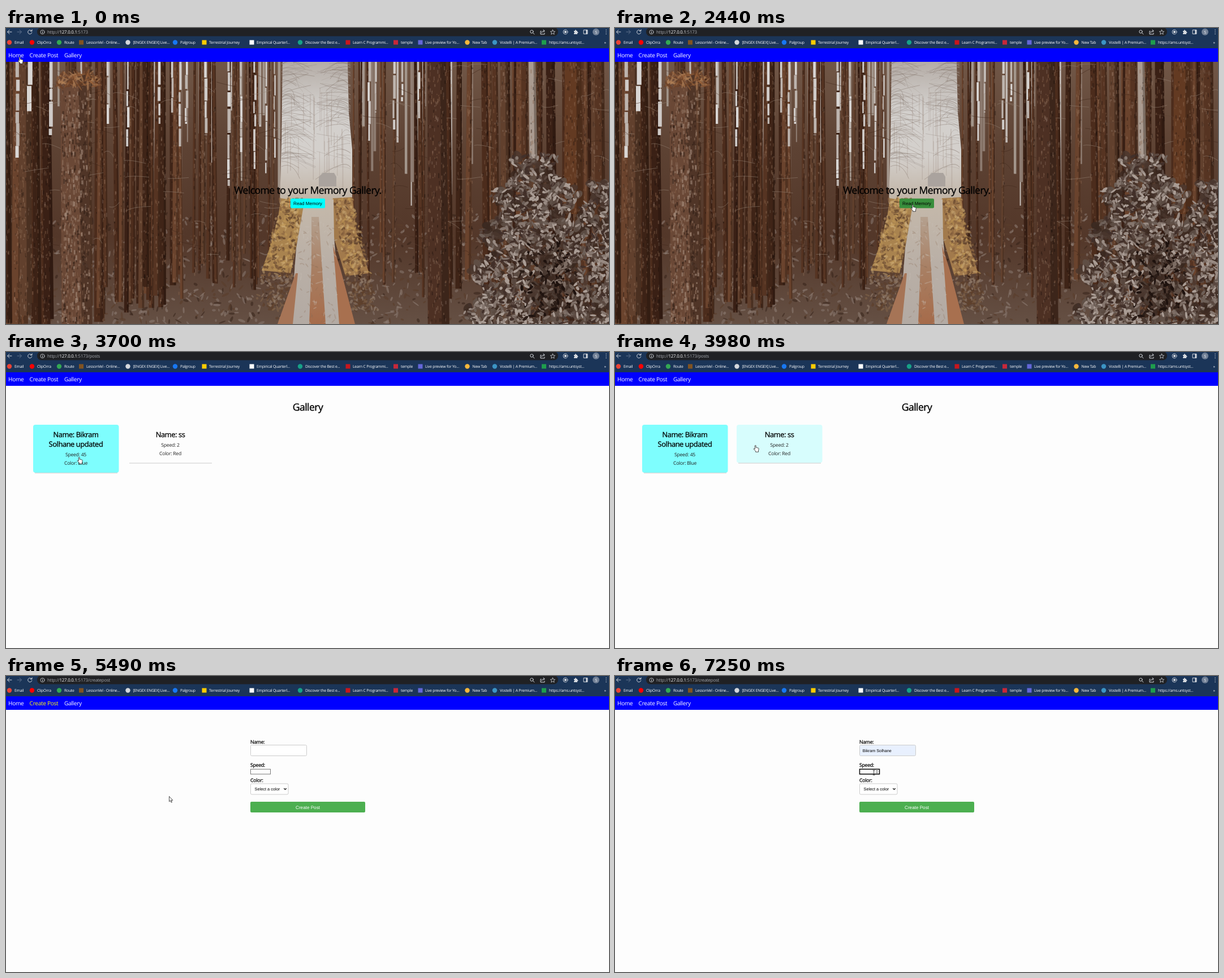
An HTML page with a canvas for the animation above (8 s loop, 1066x525 px).

```html
<!DOCTYPE html>
<html lang="en">
<head>
<meta charset="utf-8">
<title>Memory Gallery</title>
<style>
  html, body { margin: 0; width: 100%; height: 100%; overflow: hidden; background: #fdfdfd; }
  canvas, svg { position: absolute; left: 0; top: 0; display: block; }
  canvas { filter: blur(.6px); }
  svg text { font-family: "Open Sans", "Noto Sans", sans-serif; letter-spacing: -.03em; text-rendering: geometricPrecision; }
  .mid { text-anchor: middle; }
  svg .ui { font-family: "Liberation Sans", Arial, sans-serif; letter-spacing: 0; }
  .nav { font-size: 10.1px; fill: #fff; }
  .title { font-size: 17.5px; stroke: #000; stroke-width: .35px; }
  .name { font-size: 12.8px; stroke: #000; stroke-width: .3px; }
  .info { font-size: 8.6px; fill: #222; }
  .label { font-size: 8.7px; stroke: #000; stroke-width: .25px; }
  .marks text { font-size: 6.8px; fill: #fff; }
  .url { font-size: 7.9px; fill: #a5a8ad; }
  .icons { fill: none; stroke: #d5d9df; stroke-width: 1; stroke-linecap: round; stroke-linejoin: round; }
</style>
</head>
<body>
<canvas id="forest" width="1066" height="525"></canvas>
<svg width="1066" height="525" viewBox="0 0 1066 525">
  <g id="home">
    <text class="title mid" x="533.5" y="293.5">Welcome to your Memory Gallery.</text>
    <rect id="read" x="503" y="302.5" width="61" height="17" rx="2"/>
    <text class="ui mid" x="533.5" y="313.8" font-size="8.1">Read Memory</text>
  </g>

  <g id="gallery">
    <rect y="60" width="1066" height="465" fill="#fdfdfd"/>
    <text class="title mid" x="533.5" y="104">Gallery</text>
    <g id="cards">
      <path d="M51 214.6H197M218 197.2H364" stroke="#d6d6d6" stroke-width="1.2"/>
      <rect id="card1" x="48" y="129" width="151.5" height="85" rx="4" fill="#0ff"/>
      <rect id="card2" x="215" y="129" width="151.5" height="67.5" rx="4" fill="#0ff"/>
      <g class="mid">
        <text class="name" x="123.5" y="150.5">Name: Bikram</text>
        <text class="name" x="123.5" y="168">Solhane updated</text>
        <text class="info" x="123.5" y="185">Speed: 45</text>
        <text class="info" x="123.5" y="200.2">Color: Blue</text>
        <text class="name" x="290.5" y="150.5">Name: ss</text>
        <text class="info" x="290.5" y="167.5">Speed: 2</text>
        <text class="info" x="290.5" y="182.7">Color: Red</text>
      </g>
    </g>
  </g>

  <g id="form">
    <rect y="60" width="1066" height="465" fill="#fdfdfd"/>
    <text class="label" x="432" y="120">Name:</text>
    <rect id="nameBox" x="432.5" y="122.5" width="99" height="19" rx="2"/>
    <text id="nameText" class="ui" x="437.7" y="134.5" font-size="7.25">Bikram Solhane</text>
    <text class="label" x="432" y="160.8">Speed:</text>
    <rect id="speedBox" x="432.5" y="165.3" width="35" height="8.7" fill="#fff"/>
    <path id="spin" d="M461.3 169l1.8-2 1.8 2zM461.3 170.7l1.8 2 1.8-2z" fill="#444"/>
    <text class="label" x="432" y="188.4">Color:</text>
    <rect x="432.5" y="191" width="66.5" height="19" rx="2" fill="#fff" stroke="#ccc"/>
    <text class="ui" x="439.5" y="203" font-size="7.4">Select a color</text>
    <path d="M491.3 199.2l2.2 2.2 2.2-2.2" fill="none" stroke="#111" stroke-width="1.3"/>
    <rect x="432" y="223" width="203" height="19" rx="2" fill="#4caf50"/>
    <text class="ui mid" x="533.5" y="235.6" font-size="8.15" fill="#fff">Create Post</text>
    <g id="popup">
      <rect x="434" y="144" width="164" height="129" rx="3" fill="#fff" stroke="#d4d4d4"/>
      <rect id="row" x="434.5" y="147" width="163" height="19" fill="#e8e8e8"/>
      <g font-size="7.2" fill="#222">
        <text x="441" y="159">Bikram Solhane</text>
        <text x="441" y="178">Bikram Solhane updated</text>
        <text x="441" y="197">ss</text>
      </g>
    </g>
  </g>

  <rect width="1066" height="36" fill="#1b3558"/>
  <rect x="55" y="-1" width="921" height="15.5" rx="7.5" fill="#202124"/>
  <text class="url" x="73" y="10.2">http://<tspan fill="#fff">127.0.0.1</tspan>:5173<tspan id="path"></tspan></text>
  <g class="icons">
    <path d="M10 7H3M6 3.5L2.5 7 6 10.5"/>
    <path d="M20 7h7M24 3.5L27.5 7 24 10.5" stroke="#62758f"/>
    <path d="M45.2 5A3.6 3.6 0 1 0 45.8 8M46 2.8V5.5H43.3"/>
    <circle cx="64.5" cy="7.2" r="3.6" stroke-width=".8"/><path d="M64.5 7v2M64.5 5.2v.1"/>
    <circle cx="929.5" cy="6.5" r="2.7"/><path d="M931.6 8.6l2.4 2.4"/>
    <path d="M946 5.5h-1v5.5h7V9M947 8.5c.4-2.5 2-3.3 4.5-3.3M950 3l2.3 2.2L950 7.4"/>
    <path d="M966.5 3.2l1.2 2.8 3 .2-2.3 2 .8 3-2.7-1.6-2.7 1.6.8-3-2.3-2 3-.2z" stroke-width=".8"/>
    <circle cx="989" cy="7" r="4" stroke-width=".9"/><circle cx="989" cy="7" r="1.7" fill="#d5d9df"/>
    <path d="M1004 5h2c-.6-2.2 2.6-2.2 2 0h2v2c2-.5 2 2.5 0 2v2h-6V9c1.5 0 1.5-2 0-2z" fill="#d5d9df" stroke="none"/>
    <path d="M1021.5 3.5h6.5v7h-6.5z"/><path d="M1026.5 4v6" stroke-width="2.4"/>
    <path d="M1061 3.5v.1M1061 7v.1M1061 10.5v.1" stroke-width="1.5"/>
  </g>
  <circle cx="1043" cy="7" r="6" fill="#718096"/>
  <text class="mid" x="1043" y="9.5" font-size="7" fill="#fff">S</text>
  <rect id="markHover" x="39" y="18" width="45" height="15" rx="7" fill="#344a68"/>
  <g id="marks" class="marks"></g>

  <rect y="36" width="1066" height="24" fill="#00f"/>
  <text id="navHome" class="nav" x="4" y="52.2">Home</text>
  <text id="navCreate" class="nav" x="41.6" y="52.2">Create Post</text>
  <text class="nav" x="103" y="52.2">Gallery</text>

  <g id="cursor" stroke-linejoin="round">
    <path id="arrow" d="M0 0V9.3L2.1 7.4 3.6 10.8 5 10.2 3.5 6.9H6.3Z" fill="#fff" stroke="#222" stroke-width=".8"/>
    <path id="hand" d="M2.4 1Q3.3 0 4.2 1V4.4L8.5 5.3Q9.3 5.8 9.2 7L8.5 10V12.3H3.6V10.8L.2 7.3Q0 6.2 1.2 6.3L2.4 7.3Z" fill="#fff" stroke="#222" stroke-width=".8"/>
    <path id="beam" d="M-2-4.5Q0-4.5 0-3.5Q0-4.5 2-4.5M0-3.5V3.5M-2 4.5Q0 4.5 0 3.5Q0 4.5 2 4.5" fill="none" stroke="#222" stroke-width=".9"/>
  </g>
</svg>
<script>
const LOOP = 8000;
const el = id => document.getElementById(id);

// Forest picture
function paintForest() {
  const g = el('forest').getContext('2d');
  let seed = 41;
  const rnd = () => {
    seed = (seed + 0x6D2B79F5) | 0;
    let v = Math.imul(seed ^ (seed >>> 15), 1 | seed);
    v ^= v + Math.imul(v ^ (v >>> 7), 61 | v);
    return ((v ^ (v >>> 14)) >>> 0) / 4294967296;
  };
  const span = (a, b) => a + rnd() * (b - a);
  const pick = list => list[Math.floor(rnd() * list.length)];
  const shape = (color, ...points) => {
    g.fillStyle = color;
    g.beginPath();
    points.forEach(([x, y]) => g.lineTo(x, y));
    g.fill();
  };
  const fade = (y0, y1, ...colors) => {
    const f = g.createLinearGradient(0, y0, 0, y1);
    colors.forEach((c, i) => f.addColorStop(i / (colors.length - 1), c));
    return f;
  };
  const leaf = (x, y, w, h, color) => {
    g.fillStyle = color;
    g.beginPath();
    g.ellipse(x, y, w, h, span(0, 3.14), 0, 6.3);
    g.fill();
  };
  const bark = ['#3f2417', '#4c2c1c', '#563422', '#61402d', '#3a2015', '#6a432d'];
  const trunk = (x, w, top, bottom, color) => {
    const lean = span(-4, 4);
    shape(color, [x, top], [x + w * .85, top], [x + lean + w, bottom], [x + lean, bottom]);
    shape('#1c0f0b55', [x + w * .6, top], [x + w * .85, top], [x + lean + w, bottom], [x + lean + w * .65, bottom]);
    for (let i = (bottom - top) * w / 60; i > 0; i--) {
      g.fillStyle = pick(['#a3816a55', '#8a654d66', '#170c0955', '#c0a99a33']);
      g.fillRect(x + rnd() * w * .85, span(top, bottom), span(1, 2.4), span(2, 8));
    }
  };
  const slit = (x, w, bottom) => {
    for (let y = 60; y < bottom;) {
      const h = span(15, 50);
      g.fillStyle = pick(['#cfcac7', '#bdb4ae', '#d9d6d4']);
      g.fillRect(x + span(-1, 1), y, w * span(.6, 1), Math.min(h, bottom - y));
      y += h + span(0, 5);
    }
  };

  g.fillStyle = fade(60, 525, '#715747', '#5d4233', '#533729', '#655044');
  g.fillRect(0, 60, 1066, 465);

  for (let i = 0; i < 70; i++) {
    g.fillStyle = pick(['#c0b8b3', '#a2958b', '#8d7b70']);
    g.fillRect(rnd() < .55 ? span(0, 485) : span(615, 930), 60, span(2, 5), span(60, 260));
  }
  for (let i = 0; i < 1500; i++) {
    leaf(span(0, 1066), span(330, 525), span(2, 7), span(1, 2.5), pick(['#83736a99', '#93827888', '#34211888', '#5a3d2b99']));
  }
  for (let i = 0; i < 118; i++) {
    const left = rnd() < .53;
    const d = Math.pow(rnd(), .85);
    const x = left ? 480 - d * 492 : 607 + d * 465;
    trunk(x, 3 + d * span(4, 21), 60, span(385, 455) + d * 110, pick(bark));
  }

  // Sky between the trunks
  const gaps = [
    [17, 8, 230], [38, 11, 150], [76, 7, 190], [178, 6, 170], [213, 5, 210], [269, 5, 170],
    [292, 4, 150], [306, 5, 210], [317, 5, 170], [351, 6, 190], [392, 6, 280], [414, 4, 220],
    [438, 4, 250], [458, 4, 260], [474, 3, 230], [640, 5, 200], [652, 3, 150], [684, 5, 180], [699, 5, 130], [728, 4, 160]
  ];
  gaps.forEach(([x, w, bottom]) => slit(x, w, bottom));
  for (let i = 0; i < 170; i++) {
    const x = rnd() < .55 ? span(0, 480) : span(615, 1060), y = span(65, 420);
    g.strokeStyle = pick(['#40281c88', '#95817388', '#5f453688']);
    g.beginPath();
    g.moveTo(x, y);
    g.quadraticCurveTo(x + 10, y + span(-8, 4), x + span(15, 45), y + span(-10, 14));
    g.stroke();
  }

  // Clearing
  shape(fade(60, 310, '#b5ada7', '#d3d0cd', '#d4d0cc', '#bfb2a3'),
    [489, 60], [604, 60], [606, 150], [612, 215], [612, 302], [575, 305], [530, 330], [484, 312], [487, 200]);
  g.lineWidth = .7;
  for (let i = 0; i < 190; i++) {
    const left = rnd() < .5, x = left ? 487 : 609, y = 60 + 190 * Math.pow(rnd(), 1.5), s = left ? 1 : -1;
    g.strokeStyle = pick(['#8b7f7877', '#69564b77', '#aaa29b99']);
    g.beginPath();
    g.moveTo(x, y);
    g.quadraticCurveTo(x + s * span(8, 25), y - span(0, 20), x + s * span(20, 65), y + span(-18, 22));
    g.stroke();
  }
  for (let i = 0; i < 26; i++) {
    g.fillStyle = '#96857844';
    g.fillRect(span(490, 610), span(100, 220), span(1, 2), span(50, 90));
  }
  shape('#aaa39e', [553, 264], [560, 257], [580, 257], [584, 264], [584, 281], [553, 281]);

  // Verges and track
  shape('#a9834f', [486, 302], [528, 308], [513, 390], [503, 435], [452, 430], [468, 385], [481, 335]);
  shape('#a27a4c', [578, 302], [612, 300], [621, 370], [642, 435], [600, 440], [579, 370]);
  for (let i = 0; i < 800; i++) {
    const y = span(303, 500), k = (y - 303) / 197;
    const x = rnd() < .5 ? span(484 - 45 * k, 525 - 28 * k) : span(577 + 35 * k, 613 + 45 * k);
    const tones = y < 440 ? ['#c0985699', '#8a6540aa', '#5e402caa', '#cfb07b77'] : ['#7d6048aa', '#5e402caa', '#8f7a69aa'];
    leaf(x, y, span(2, 5), span(1, 2.4), pick(tones));
  }
  shape(fade(315, 525, '#c4b8aa', '#b9afa6', '#b3aaa3'), [527, 310], [579, 304], [580, 370], [592, 525], [503, 525], [513, 390]);
  shape('#a8704f', [578, 385], [592, 430], [617, 525], [589, 525], [582, 430]);
  shape('#a67456', [512, 435], [516, 435], [507, 525], [480, 525]);
  shape(fade(330, 525, '#b5a291', '#a87f63', '#a66b4a'), [540, 335], [553, 335], [559, 430], [565, 525], [536, 525], [540, 420]);
  for (let i = 0; i < 110; i++) {
    leaf(span(515, 585), span(340, 525), span(2, 5), 1, pick(['#c9c0b855', '#896b5844']));
  }

  // Foreground trees
  trunk(96, 54, 82, 525, '#6a4836');
  for (let i = 0; i < 420; i++) {
    g.fillStyle = pick(['#a58c7c99', '#8c6e5c99', '#2e1c1477']);
    g.fillRect(span(98, 147), span(112, 525), span(1, 4), span(3, 9));
  }
  for (let i = 0; i < 90; i++) {
    leaf(span(90, 165), span(79, 104), span(4, 10), span(1, 2), pick(['#96603a99', '#6c412699', '#b0805699']));
  }
  trunk(745, 38, 60, 525, '#4d3023');
  trunk(988, 34, 60, 330, '#633a22');
  trunk(924, 14, 60, 240, '#aa9b90');

  // Shrub, in ragged tiers
  const inShrub = (x, y) => {
    const k = (y - 222) / 300, ragged = 14 * Math.sin(y / 11);
    const cone = k > 0 && Math.abs(x - 935) < 12 + 105 * Math.sqrt(k) + ragged;
    return cone || (x > 1025 + ragged && y > 275) || (x > 985 && y > 390);
  };
  for (let i = 0; i < 2900; i++) {
    const x = span(810, 1070), y = span(224, 530);
    if (!inShrub(x, y)) continue;
    if (i < 800) { leaf(x, y, 9, 6, pick(['#4a372ecc', '#3b2920cc', '#62524acc'])); continue; }
    const core = Math.hypot((x - 960) / 60, (y - 450) / 85) < span(.4, 1.1);
    leaf(x, y, span(3, 7), span(1.3, 2.8), pick(core
      ? ['#1e120e', '#2c1e18', '#4a3a32', '#7d6d64']
      : ['#85766e', '#988a82', '#6e6058', '#5a4840', '#aa9d95', '#42302a']));
  }
}

// Bookmark: icon centre, icon colour, square or round, label offset, label
[
  [6, '#ea4335', 0, 9, 'Email'],
  [46, '#f00', 0, 9, 'ClipOrra'],
  [94, '#34a853', 0, 9, 'Route'],
  [133, '#805322', 1, 9, 'LessonVel - Online...'],
  [215.5, '#d4d7dc', 0, 9, '[ENGEX ENGEX] Live...'],
  [299, '#1877f2', 0, 9, 'Palgroup'],
  [350.5, '#fc0', 1, 8.5, 'Terrestrial Journey'],
  [434.5, '#fff', 1, 8.5, 'Empirical Quarterl...'],
  [520, '#17a087', 0, 9, 'Discover the Best e...'],
  [604.5, '#c8161d', 1, 8.5, 'Learn C Programmi...'],
  [689, '#c6283a', 1, 9, 'temple'],
  [732.5, '#6366d8', 1, 8.5, 'Live preview for Yo...'],
  [815.5, '#f6b73c', 0, 9, 'New Tab'],
  [864, '#3c94c4', 0, 9, 'Vostelli | A Premium...'],
  [951, '#1f9d4d', 1, 9, 'https://ams.untsyst...'],
  [1050, 'none', 0, 7.5, '»']
].forEach(([x, color, square, gap, label]) => {
  const icon = square
    ? `<rect x="${x - 4}" y="21.5" width="8" height="8" fill="${color}"/>`
    : `<circle cx="${x}" cy="25.5" r="4.2" fill="${color}"/>`;
  el('marks').innerHTML += `${icon}<text x="${x + gap}" y="27.8">${label}</text>`;
});

// Held states: [start, value...]
const tracks = {
  cursor: [
    [0, 'hand', 21, 51], [740, 'hand', 21, 54], [890, 'arrow', 581, 257], [1030, 'hand', 21, 54],
    [1170, 'arrow', 180, 130], [1290, 'arrow', 468, 227], [1410, 'arrow', 330, 110], [1540, 'arrow', 215, 62],
    [1660, 'arrow', 260, 159], [1800, 'arrow', 150, 100], [1920, 'hand', 70, 49],
    [2070, 'arrow', 210, 150], [2190, 'arrow', 410, 270], [2320, 'arrow', 540, 319], [2440, 'hand', 523, 313],
    [2840, 'arrow', 526, 313], [2990, 'arrow', 598, 312], [3130, 'arrow', 493, 105], [3270, 'arrow', 277, 251],
    [3420, 'arrow', 374, 112], [3550, 'hand', 150, 170], [3700, 'hand', 126, 186], [3850, 'hand', 150, 180],
    [3980, 'hand', 245, 165], [4110, 'hand', 290, 150], [4230, 'arrow', 190, 110], [4360, 'arrow', 54, 32],
    [4510, 'arrow', 56, 34], [4640, 'hand', 66, 48], [4760, 'hand', 74, 53], [5230, 'hand', 75, 56],
    [5350, 'hand', 76, 59], [5490, 'arrow', 288.5, 213.5], [5650, 'arrow', 595, 170], [5800, 'arrow', 520, 150],
    [5930, 'beam', 470, 131], [6450, 'arrow', 478, 148], [6590, 'arrow', 474, 153], [6830, 'arrow', 466, 151],
    [6970, 'arrow', 464, 156], [7120, 'beam', 464, 169], [7250, 'beam', 457.7, 171.5]
  ],
  page: [[0, 'home'], [2840, 'gallery'], [5490, 'form']],
  path: [[0, ''], [2840, '/posts'], [5230, '/createpost']],
  homeLink: [[0, '#fff'], [150, '#ff0'], [890, '#ff9'], [1030, '#fff']],
  createLink: [[0, '#fff'], [1920, '#ff0'], [2070, '#fff'], [4640, '#ff0'], [5650, '#fff']],
  read: [[0, '#0ff'], [2440, '#388e3c']],
  card1: [[0, 0], [3550, .18], [3700, .5], [3850, .95], [3980, .5], [4110, .1], [4230, 0]],
  card2: [[0, 0], [3980, .15], [4110, .6], [4230, .5], [4360, .18], [4510, 0]]
};
const at = (name, t) => tracks[name].findLast(step => step[0] <= t).slice(1);
const show = (id, on) => { el(id).style.display = on ? '' : 'none'; };
const paint = (id, color) => { el(id).style.fill = color; };
const border = (id, focused, color) => {
  el(id).style.stroke = focused ? '#111' : color;
  el(id).style.strokeWidth = focused ? 1.6 : 1;
};

function render(t) {
  const [page] = at('page', t);
  ['home', 'gallery', 'form'].forEach(id => show(id, id === page));
  show('cards', t >= 2990);
  el('path').textContent = at('path', t)[0];

  paint('navHome', at('homeLink', t)[0]);
  paint('navCreate', at('createLink', t)[0]);
  paint('read', at('read', t)[0]);
  ['card1', 'card2'].forEach(id => { el(id).style.opacity = at(id, t)[0]; });
  show('markHover', t >= 4360 && t < 4640);

  const filled = t >= 6590;
  paint('nameBox', filled ? '#e8f0fe' : '#fff');
  border('nameBox', t >= 6190 && t < 7120, '#ccc');
  border('speedBox', t >= 7250, '#777');
  show('nameText', filled);
  show('popup', t >= 6190 && t < 6830);
  show('row', filled);
  show('spin', t >= 7120);

  const [kind, x, y] = at('cursor', t);
  ['arrow', 'hand', 'beam'].forEach(id => show(id, id === kind));
  el('cursor').setAttribute('transform', `translate(${x} ${y})`);
}

paintForest();
const start = performance.now();
function tick() {
  render((performance.now() - start) % LOOP);
  requestAnimationFrame(tick);
}
tick();
</script>
</body>
</html>
```
